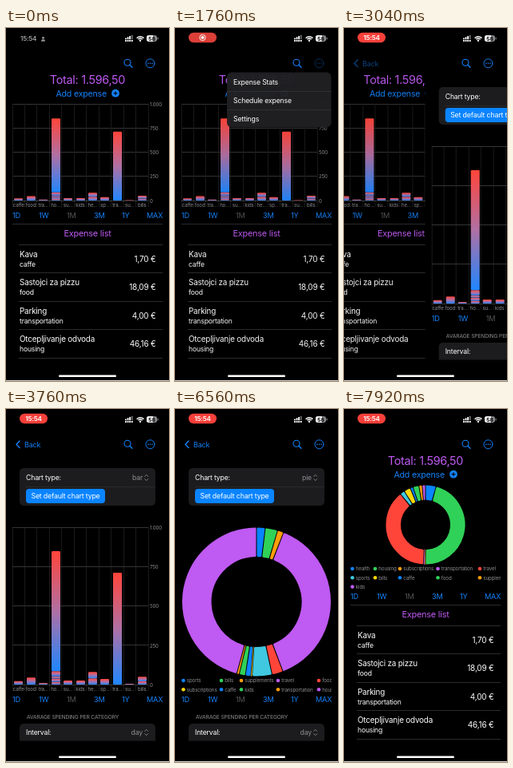
Animation, 204 px wide and 442 px high, one loop 8000 ms. Source, as an HTML page with a canvas:

```html
<!DOCTYPE html>
<html lang="en">
<head>
<meta charset="utf-8">
<title>Expenses</title>
<style>
html, body { margin: 0; width: 100%; height: 100%; overflow: hidden; background: #000; }
canvas { display: block; width: 204px; height: 442px; }
</style>
</head>
<body>
<canvas id="stage"></canvas>
<script>
const W = 204, H = 442, LOOP = 8000;
const canvas = document.getElementById('stage');
const ctx = canvas.getContext('2d');
const dpr = window.devicePixelRatio || 1;
canvas.width = W * dpr;
canvas.height = H * dpr;

const BLUE = '#1482fa', PURPLE = '#bf5af2', RED = '#ff453a', GREY = '#8e8e93';
const CARD = '#1c1c1e', LINE = '#2c2c2e', GRID = '#343436';
const CYCLE = ['#0a84ff', '#30d158', '#ff9f0a', PURPLE, RED, '#40c8e0', '#ffd60a'];

// Stacked amounts per category, from the axis upwards
const SPENT = {
  caffe: [22], food: [45], transportation: [10],
  housing: [16, 22, 14, 33, 765], supplements: [25], kids: [25],
  health: [40, 40], sports: [35], travel: [712],
  subscriptions: [5], bills: [20, 30]
};
const TICKS = ['caffe', 'food', 'tra...', 'ho...', 'su...', 'kids', 'he...', 'sp...', 'tra...', 'su...', 'bills'];
const STATS_ORDER = ['sports', 'bills', 'supplements', 'travel', 'food', 'health',
  'subscriptions', 'caffe', 'kids', 'transportation', 'housing'];
const HOME_ORDER = ['health', 'housing', 'subscriptions', 'transportation', 'travel', 'sports',
  'bills', 'caffe', 'food', 'supplements', 'kids'];
const EXPENSES = [
  ['Kava', 'caffe', '1,70 €'],
  ['Sastojci za pizzu', 'food', '18,09 €'],
  ['Parking', 'transportation', '4,00 €'],
  ['Otcepljivanje odvoda', 'housing', '46,16 €']
];

const sum = list => list.reduce((a, b) => a + b, 0);
const clamp = v => Math.max(0, Math.min(1, v));
const easeOut = (t, start, dur) => 1 - (1 - clamp((t - start) / dur)) ** 3;
const easeIO = (t, start, dur) => {
  const p = clamp((t - start) / dur);
  return 1 - (1 - p) ** 3 * (1 + 3 * p);
};

function text(str, x, y, size, color = '#fff', align = 'left', weight = 400) {
  ctx.font = `${weight} ${size}px Inter, "Open Sans", sans-serif`;
  ctx.letterSpacing = `${-0.02 * size}px`;
  ctx.textAlign = align;
  ctx.fillStyle = color;
  ctx.fillText(str, x, y + size * 0.36);
}

function box(x, y, w, h, r, color) {
  ctx.fillStyle = color;
  ctx.beginPath();
  ctx.roundRect(x, y, w, h, r);
  ctx.fill();
}

function dot(x, y, r, color) {
  ctx.fillStyle = color;
  ctx.beginPath();
  ctx.arc(x, y, r, 0, Math.PI * 2);
  ctx.fill();
}

function ring(x, y, r, color, width) {
  ctx.strokeStyle = color;
  ctx.lineWidth = width;
  ctx.beginPath();
  ctx.arc(x, y, r, 0, Math.PI * 2);
  ctx.stroke();
}

function line(points, color, width) {
  ctx.strokeStyle = color;
  ctx.lineWidth = width;
  ctx.beginPath();
  points.forEach(([x, y]) => ctx.lineTo(x, y));
  ctx.stroke();
}

// Crisp one-pixel horizontal rule
function rule(x0, x1, y, color = LINE) {
  const mid = Math.floor(y) + 0.5;
  line([[x0, mid], [x1, mid]], color, 1);
}

function layer(alpha, draw) {
  if (alpha <= 0) return;
  ctx.save();
  ctx.globalAlpha *= alpha;
  draw();
  ctx.restore();
}

function barChart(top, bottom) {
  const left = 8, width = 170, step = width / TICKS.length, unit = (bottom - top) / 1000;
  for (let i = 0; i <= 4; i++) {
    const y = bottom - (bottom - top) * i / 4;
    rule(left, left + width, y, GRID);
    text(['0', '250', '500', '750', '1.000'][i], 180, y + 0.5, 6.1, GREY);
  }
  ctx.setLineDash([1, 1]);
  for (let i = 0; i <= TICKS.length; i++) {
    const x = Math.floor(left + step * i) + 0.5;
    line([[x, top], [x, bottom + 8]], GRID, 1);
  }
  ctx.setLineDash([]);
  Object.values(SPENT).forEach((parts, i) => {
    const mid = left + step * (i + 0.5);
    let y = bottom;
    for (const value of parts) {
      const h = value * unit;
      const fill = ctx.createLinearGradient(0, y - h, 0, y);
      fill.addColorStop(0, RED);
      fill.addColorStop(0.5, '#b070a4');
      fill.addColorStop(1, '#2086ff');
      box(Math.round(mid - 5.5), y - h, 11, h, Math.min(1.2, h / 2), fill);
      y -= h;
    }
    text(TICKS[i], mid, bottom + 6, 6.1, GREY, 'center');
  });
}

function slice(cx, cy, r0, r1, from, to, color) {
  const inset = Math.min(1.8, (to - from) * r0 * 0.35);
  const a = inset / r0, b = inset / r1;
  ctx.beginPath();
  ctx.arc(cx, cy, r1 - inset, from + b, to - b);
  ctx.arc(cx, cy, r0 + inset, to - a, from + a, true);
  ctx.closePath();
  ctx.fillStyle = ctx.strokeStyle = color;
  ctx.lineJoin = 'round';
  ctx.lineWidth = Math.max(0.2, inset * 2 - 1);
  ctx.fill();
  ctx.stroke();
}

function pieChart(order, cx, cy, r0, r1) {
  const total = sum(order.map(name => sum(SPENT[name])));
  let angle = -Math.PI / 2;
  order.forEach((name, i) => {
    const end = angle + sum(SPENT[name]) / total * Math.PI * 2;
    slice(cx, cy, r0, r1, angle, end, CYCLE[i % CYCLE.length]);
    angle = end;
  });
}

function legend(order, columns, y, rowStep) {
  ctx.save();
  ctx.beginPath();
  ctx.rect(8, y - 6, 188, 40);
  ctx.clip();
  order.forEach((name, i) => {
    const x = columns[i % columns.length];
    const rowY = y + rowStep * Math.floor(i / columns.length);
    dot(x, rowY, 2.3, CYCLE[i % CYCLE.length]);
    text(name, x + 4.3, rowY, 6.2, GREY);
  });
  ctx.restore();
}

function ranges(y) {
  [['1D', 8], ['1W', 41], ['1M', 76], ['3M', 110], ['1Y', 145], ['MAX', 176]]
    .forEach(([name, x]) => text(name, x, y, 9.2, name === '1M' ? '#545458' : BLUE));
}

function home(isPie) {
  text('Total: 1.596,50', 102, 65, 14.4, PURPLE, 'center');
  text('Add expense', 62.5, 82, 10.6, BLUE);
  dot(137, 81.7, 4.9, BLUE);
  line([[134.5, 81.7], [139.5, 81.7]], '#000', 1.1);
  line([[137, 79.2], [137, 84.2]], '#000', 1.1);
  if (isPie) {
    pieChart(HOME_ORDER, 102, 145, 30.5, 50);
    legend(HOME_ORDER, [10.5, 39, 70, 117.5, 170], 200, 11.3);
  } else {
    barChart(95, 216);
  }
  ranges(235);
  rule(8, 196, 245);
  text('Expense list', 102, 257, 10.9, PURPLE, 'center');
  rule(16, 196, 271);
  EXPENSES.forEach(([title, kind, price], i) => {
    const y = 289 + 35.6 * i;
    text(title, 17, y - 6, 9.9);
    text(kind, 17, y + 6.5, 8.6);
    text(price, 187.5, y, 10, '#fff', 'right');
    rule(16, 196, y + 17.6);
  });
}

function picker(label, value, y) {
  text(label, 25, y, 8.7);
  text(value, 171, y, 8.7, GREY, 'right');
  line([[173.5, y - 1.4], [175.7, y - 3.6], [177.9, y - 1.4]], GREY, 0.9);
  line([[173.5, y + 1.4], [175.7, y + 3.6], [177.9, y + 1.4]], GREY, 0.9);
}

function stats(pie) {
  box(17, 74, 170, 47, 5, CARD);
  picker('Chart type:', pie > 0 ? 'pie' : 'bar', 86);
  line([[25, 97.5], [187, 97.5]], '#38383a', 0.5);
  box(25, 100, 99, 18, 4, '#0a84ff');
  text('Set default chart type', 74.5, 109, 8.8, '#fff', 'center');
  layer(1 - pie, () => barChart(148.5, 345));
  layer(pie, () => {
    pieChart(STATS_ORDER, 102, 241.5, 56, 93.5);
    legend(STATS_ORDER, [10.5, 58, 83, 129, 180, 214], 340, 11.3);
  });
  ranges(364);
  text('AVARAGE SPENDING PER CATEGORY', 26, 386, 6.7, GREY);
  box(17, 394, 170, 21.5, [5, 5, 0, 0], CARD);
  picker('Interval:', 'day', 405);
}

function page(x, draw) {
  if (Math.abs(x) >= W) return;
  ctx.save();
  ctx.translate(x, 0);
  ctx.fillStyle = '#000';
  ctx.fillRect(0, 0, W, H);
  draw();
  ctx.restore();
}

function dim(alpha) {
  layer(alpha, () => box(0, 0, W, H, 0, '#000'));
}

function popup(open, ox, oy, draw) {
  layer(open ** 1.5, () => {
    ctx.translate(ox, oy);
    ctx.scale(open, open);
    ctx.translate(-ox, -oy);
    draw();
  });
}

function actionMenu() {
  box(65, 55.5, 130.5, 69, 6, 'rgba(32,32,35,.97)');
  ['Expense Stats', 'Schedule expense', 'Settings'].forEach((name, i) => {
    const y = 68 + 23 * i;
    text(name, 73, y, 8.7);
    if (i) line([[65, y - 11.5], [195.5, y - 11.5]], '#3c3c3f', 0.6);
  });
}

function typeMenu(pie) {
  box(48, 97, 130.5, 46, 6, 'rgba(33,34,37,.97)');
  const tint = ctx.createLinearGradient(48, 105, 135, 130);
  tint.addColorStop(0, 'rgba(10,60,120,.35)');
  tint.addColorStop(1, 'rgba(10,60,120,0)');
  box(48, 97, 130.5, 46, 6, tint);
  line([[48, 120], [178.5, 120]], '#3c3c3f', 0.6);
  text('bar', 64, 109, 8.8);
  text('pie', 64, 132, 8.8);
  const y = pie ? 132 : 109;
  line([[54.5, y + 0.3], [56.6, y + 2.8], [60.6, y - 3.2]], '#fff', 1.1);
}

function navBar(back, menuOpen) {
  ctx.lineCap = 'round';
  ring(152, 43.3, 4, BLUE, 1.1);
  line([[155, 46.3], [158, 49.3]], BLUE, 1.3);
  layer(1 - 0.65 * menuOpen, () => {
    ring(180.5, 44.3, 5.5, BLUE, 1);
    [-2.5, 0, 2.5].forEach(dx => dot(180.5 + dx, 44.3, 0.8, BLUE));
  });
  layer(back, () => {
    line([[17, 40], [13, 44.3], [17, 48.6]], BLUE, 1.4);
    text('Back', 23, 44.3, 9, BLUE);
  });
  ctx.lineCap = 'butt';
}

function statusBar(t) {
  if (t < 400) {
    text('15:54', 18, 13.5, 8.2, '#b4b4b6', 'left', 500);
    dot(46.5, 12.2, 1.5, GREY);
    box(44, 14.2, 5, 2.6, [2, 2, 0.5, 0.5], GREY);
  } else {
    const timed = t >= 3000;
    box(17, 5.8, 35, 12.4, 6.2, timed ? '#f8403a' : '#dc3f38');
    if (timed) {
      text('15:54', 34.5, 12, 8.2, '#fff', 'center', 600);
    } else {
      ring(34.5, 12, 3.7, '#fff', 0.9);
      dot(34.5, 12, 2, '#fff');
    }
  }
  for (let i = 0; i < 4; i++) {
    const h = 1.8 + i * 1.2;
    box(149 + i * 2.6, 14.2 - h, 1.9, h, 0.5, i < 3 ? '#fff' : '#69696d');
    box(149 + i * 2.6, 15.1, 1.9, 1.8, 0.5, '#fff');
  }
  [5.8, 3.5].forEach(r => {
    ctx.strokeStyle = '#fff';
    ctx.lineWidth = 1.4;
    ctx.beginPath();
    ctx.arc(168, 16.5, r, -Math.PI * 0.77, -Math.PI * 0.23);
    ctx.stroke();
  });
  dot(168, 15.8, 1.2, '#fff');
  box(176, 9.2, 13, 7.8, 2.4, '#8a8a8e');
  box(176, 9.2, 8, 7.8, [2.4, 0, 0, 2.4], '#fff');
  box(189.6, 11.7, 1, 2.8, 0.5, '#8a8a8e');
  text('58', 182.5, 13.1, 6.8, '#000', 'center', 700);
}

function render(t) {
  const actions = easeOut(t, 912, 420) * (1 - easeOut(t, 2760, 260));
  const types = easeOut(t, 4420, 420) * (1 - easeOut(t, 6200, 260));
  const pushed = easeIO(t, 2840, 520) * (1 - easeIO(t, 7200, 520));
  const pie = clamp((t - 6240) / 200);

  ctx.setTransform(dpr, 0, 0, dpr, 0, 0);
  ctx.globalAlpha = 1;
  ctx.fillStyle = '#000';
  ctx.fillRect(0, 0, W, H);

  if (pushed < 0.999) page(-61 * pushed, () => home(t > 5000));
  dim(0.04 * actions + 0.1 * pushed);
  if (pushed > 0.001) page(W * (1 - pushed), () => stats(pie));
  dim(0.04 * types);

  navBar(pushed, clamp(actions * 2));
  popup(actions, 183, 55.5, actionMenu);
  popup(types, 168, 97, () => typeMenu(pie > 0));
  statusBar(t);
  box(66, 434.4, 72, 2.6, 1.3, '#fff');
  box(0, H - 1, W, 1, 0, '#d8d8d8');
}

const begin = performance.now();
function tick() {
  render((performance.now() - begin) % LOOP);
  requestAnimationFrame(tick);
}
tick();
</script>
</body>
</html>
```
